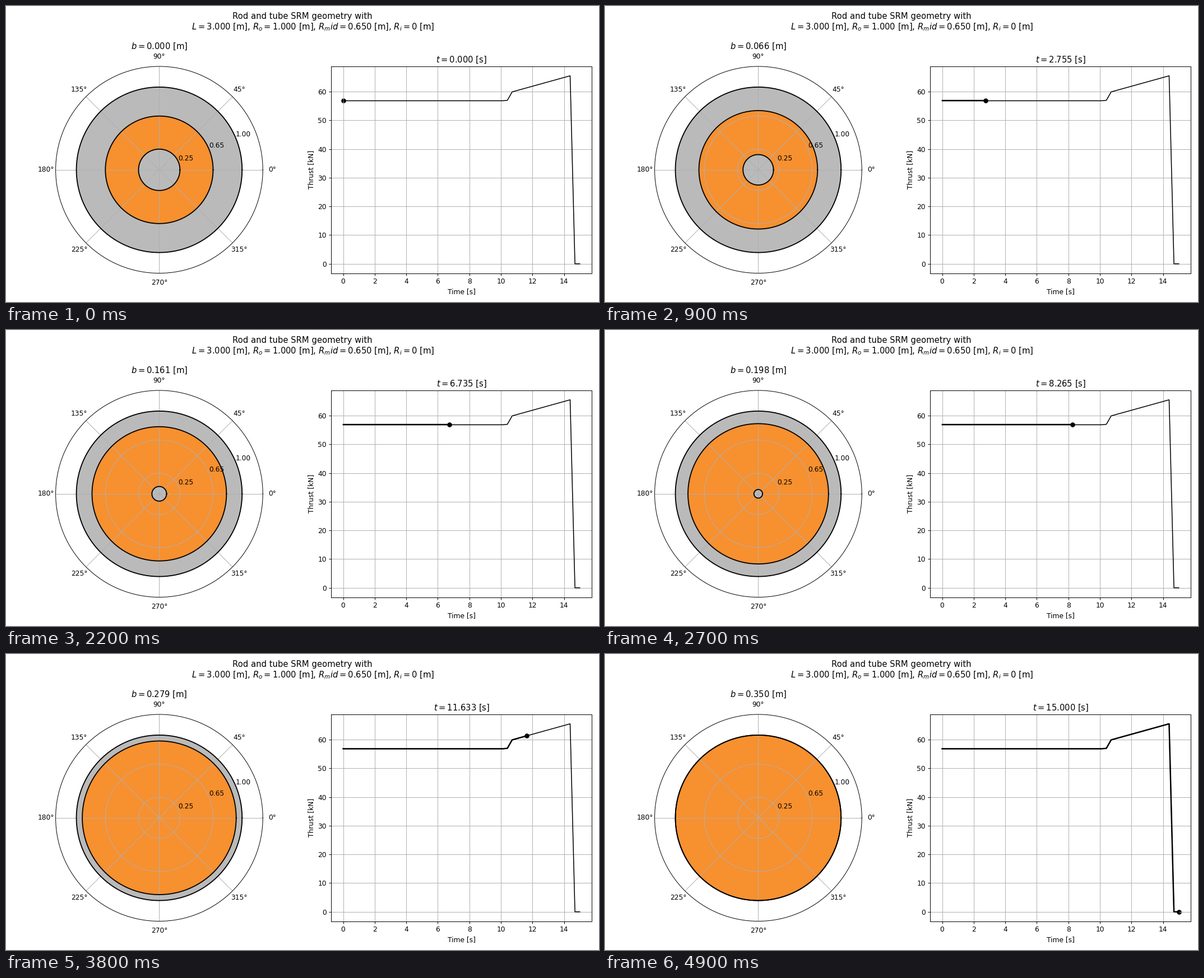
A matplotlib script for the animation above (5000 ms loop, 1058 by 529 pixels).

```python
import numpy as np
import matplotlib.pyplot as plt
from matplotlib.animation import FuncAnimation

W, H = 1058, 529
DPI = W / 12  # a 12 x 6 inch figure
FRAMES = 50
R_OUT, R_MID, R_ROD = 1.0, 0.65, 0.25
WEB = R_OUT - R_MID
BURN_RATE = 0.02396
GRAY, ORANGE = "#bababa", "#f7902f"

# Thrust history: neutral burn, tube-only rise, burnout
t = np.linspace(0, 15, FRAMES)
burn = np.minimum(BURN_RATE * t, WEB)
knots = [0, 33, 34, 35, 47, 48, 49]
levels = [56.8, 56.8, 56.95, 59.9, 65.5, 0, 0]
thrust = np.interp(np.arange(FRAMES), knots, levels)

theta = np.linspace(0, 2 * np.pi, 241)


def box(left, top, width, height):
    """Figure rectangle from pixels measured from the top left."""
    return [left / W, 1 - (top + height) / H, width / W, height / H]


def ring(r):
    return np.column_stack([theta, np.full_like(theta, r)])


fig = plt.figure(figsize=(12, 6), dpi=DPI)
fig.set_size_inches((W + 0.01) / DPI, (H + 0.01) / DPI)
fig.suptitle("Rod and tube SRM geometry with\n" + " " * 8
             + r"$L=3.000$ [m], $R_o=1.000$ [m], $R_mid=0.650$ [m], $R_i=0$ [m]")

# Grain cross-section
grain = fig.add_axes(box(88.6, 107.95, 369.6, 369.6), projection="polar")


def disc(r, color):
    fill, = grain.fill(*ring(r).T, color=color, lw=0)
    edge, = grain.plot(*ring(r).T, "k", lw=1.5)
    return fill, edge


disc(R_OUT, GRAY)
bore = disc(R_MID, ORANGE)
rod = disc(R_ROD, GRAY)
grain.set_rlim(0, 1.25)
grain.set_rticks([R_ROD, R_MID, R_OUT])

# Thrust curve
curve = fig.add_axes(box(580.4, 107.95, 464.4, 369.6))
curve.plot(t, thrust, "k", lw=1.25)
done, = curve.plot([], [], "k", lw=2)
dot = curve.scatter(t[:1], thrust[:1], color="k")
curve.set_xlim(-0.75, 15.75)
margin = 0.05 * thrust.max()
curve.set_ylim(-margin, thrust.max() + margin)
curve.set_xlabel("Time [s]")
curve.set_ylabel("Thrust [kN]")
curve.grid(True)


def resize(parts, r):
    fill, edge = parts
    fill.set_xy(ring(r))
    edge.set_data(*ring(r).T)
    for part in parts:
        part.set_visible(r > 0)


def update(i):
    b = burn[i]
    resize(bore, R_MID + b)
    resize(rod, max(R_ROD - b, 0))
    done.set_data(t[:i + 1], thrust[:i + 1])
    dot.set_offsets([[t[i], thrust[i]]])
    grain.set_title(f"$b={b:.3f}$ [m]")
    curve.set_title(f"$t={t[i]:.3f}$ [s]")
    return *bore, *rod, done, dot


anim = FuncAnimation(fig, update, frames=FRAMES, interval=100,
                     repeat=True, repeat_delay=0, blit=False)
plt.show()
```
